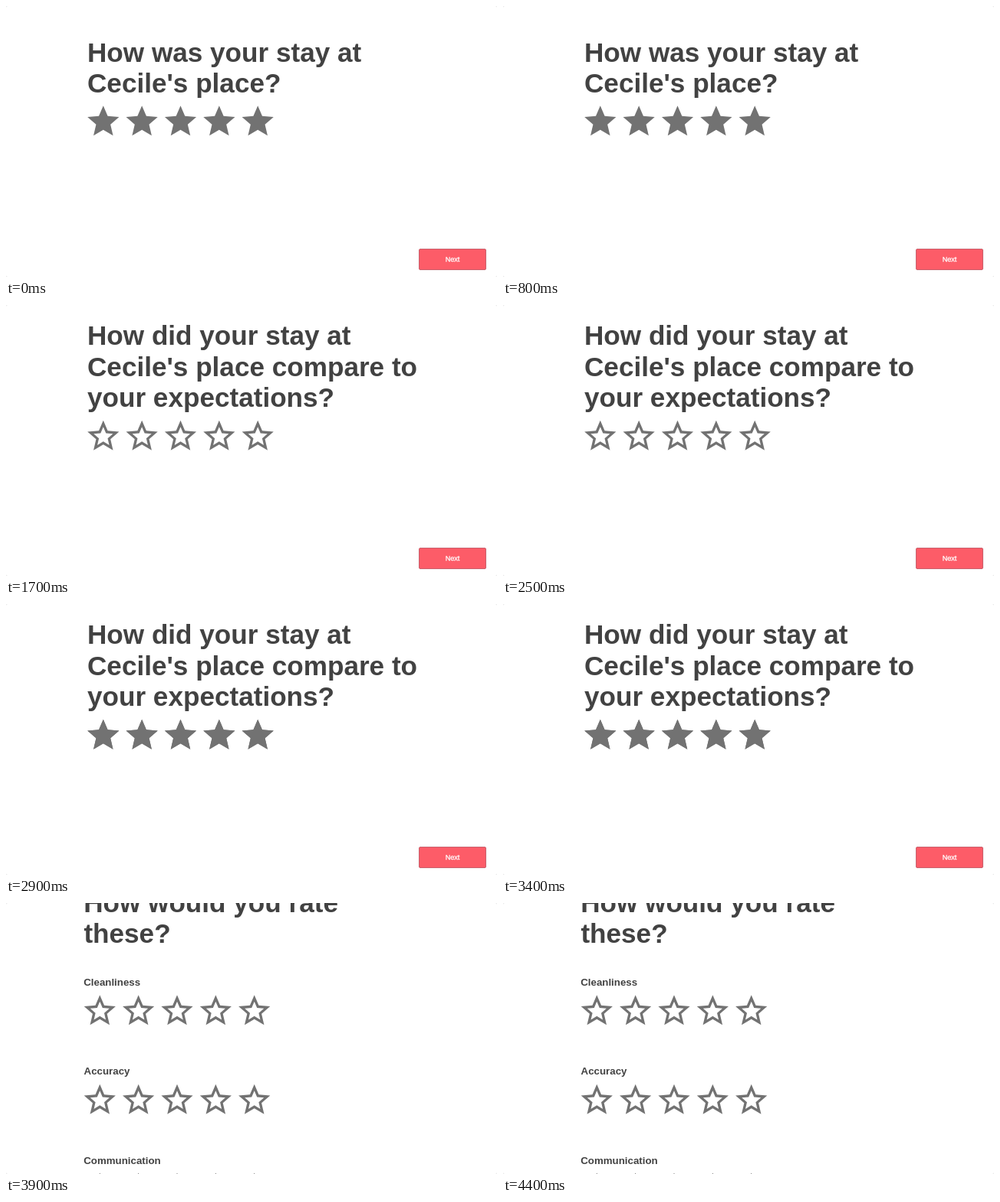
These frames come from a looping animation (640 px wide and 354 px high, 5400 ms). An HTML page:

```html
<!DOCTYPE html>
<html lang="en">
<head>
<meta charset="utf-8">
<title>Stay review</title>
<style>
  html, body { margin: 0; width: 100%; height: 100%; overflow: hidden; background: #e9e9e9; }
  svg { display: block; width: 100vw; height: 100vh; }
  text { font-family: "Liberation Sans", Arial, Helvetica, sans-serif; font-weight: bold; fill: #424242; }
  .title { font-size: 35.13px; }
  .label { font-size: 13.3px; }
  .next { font-size: 9.1px; font-weight: normal; fill: #fff; stroke: #fff; stroke-width: .3px; }
  .stars { fill: #727272; }

  .stay, .compare, .rate, .rated, .button, .ring { animation: 5400ms step-end infinite; }
  .stay { animation-name: stay; }
  .compare { animation-name: compare; }
  .rate { animation-name: rate; }
  .rated { animation-name: rated; }
  .button { animation-name: button; }
  .ring { animation-name: ring; }

  @keyframes stay { 0% { opacity: 1 } 31.4815%, 100% { opacity: 0 } }
  @keyframes compare { 0% { opacity: 0 } 31.4815% { opacity: 1 } 72.2222%, 100% { opacity: 0 } }
  @keyframes rate { 0% { opacity: 0 } 72.2222%, 100% { opacity: 1 } }
  @keyframes rated { 0% { opacity: 0 } 53.7037%, 100% { opacity: 1 } }
  @keyframes button { 0% { opacity: 1 } 72.2222%, 100% { opacity: 0 } }
  @keyframes ring {
    0% { opacity: 0 }
    27.7778% { opacity: 1 }
    31.4815% { opacity: 0 }
    70.3704% { opacity: 1 }
    72.2222%, 100% { opacity: 0 }
  }
</style>
</head>
<body>
<svg viewBox="0 0 640 354" preserveAspectRatio="none">
  <defs>
    <!-- Stars are centred on x = 0 with the top tip at y = 0 -->
    <path id="full" transform="scale(2.06) translate(-12 -2)"
      d="M12 17.27L18.18 21l-1.64-7.03L22 9.24l-7.19-.61L12 2 9.19 8.63 2 9.24l5.46 4.73L5.82 21z"/>
    <path id="hollow" transform="scale(2.06) translate(-12 -2)"
      d="M22 9.24l-7.19-.62L12 2 9.19 8.63 2 9.24l5.46 4.73L5.82 21 12 17.27 18.18 21l-1.63-7.03L22 9.24zM12 15.4l-3.76 2.27 1-4.28-3.32-2.88 4.38-.38L12 6.1l1.71 4.04 4.38.38-3.32 2.88 1 4.28L12 15.4z"/>
    <g id="fullRow">
      <use href="#full"/><use href="#full" x="50.35"/><use href="#full" x="100.7"/>
      <use href="#full" x="151.05"/><use href="#full" x="201.4"/>
    </g>
    <g id="hollowRow">
      <use href="#hollow"/><use href="#hollow" x="50.35"/><use href="#hollow" x="100.7"/>
      <use href="#hollow" x="151.05"/><use href="#hollow" x="201.4"/>
    </g>
  </defs>

  <rect width="640" height="354" rx="3" fill="#fff"/>

  <g class="stay">
    <text class="title" x="106" y="72.6">How was your stay at</text>
    <text class="title" x="106" y="113.1">Cecile's place?</text>
    <use class="stars" href="#fullRow" x="126.8" y="130.2"/>
  </g>

  <g class="compare">
    <text class="title" x="106" y="52.1">How did your stay at</text>
    <text class="title" x="106" y="92.6">Cecile's place compare to</text>
    <text class="title" x="106" y="133.1">your expectations?</text>
    <use class="stars" href="#hollowRow" x="126.8" y="150.7"/>
    <g class="rated"><use class="stars" href="#fullRow" x="126.8" y="150.7"/></g>
  </g>

  <g class="button">
    <rect x="538.5" y="317.5" width="87" height="27" rx="1.5" fill="#fd5c68" stroke="#c8626e"/>
    <text class="next" x="582" y="333.7" text-anchor="middle">Next</text>
    <rect class="ring" x="538.5" y="317.5" width="87" height="27" rx="1.5" fill="none" stroke="#6f4f9c"/>
  </g>

  <g class="rate">
    <text class="title" x="101.2" y="11.6">How would you rate</text>
    <text class="title" x="101.4" y="52.1">these?</text>
    <text class="label" x="101.2" y="107.6">Cleanliness</text>
    <use class="stars" href="#hollowRow" x="122.3" y="120.2"/>
    <text class="label" x="101.6" y="224.2">Accuracy</text>
    <use class="stars" href="#hollowRow" x="122.3" y="236.7"/>
    <text class="label" x="101.2" y="340.9">Communication</text>
    <use class="stars" href="#hollowRow" x="122.3" y="352.4"/>
  </g>
</svg>
</body>
</html>
```
